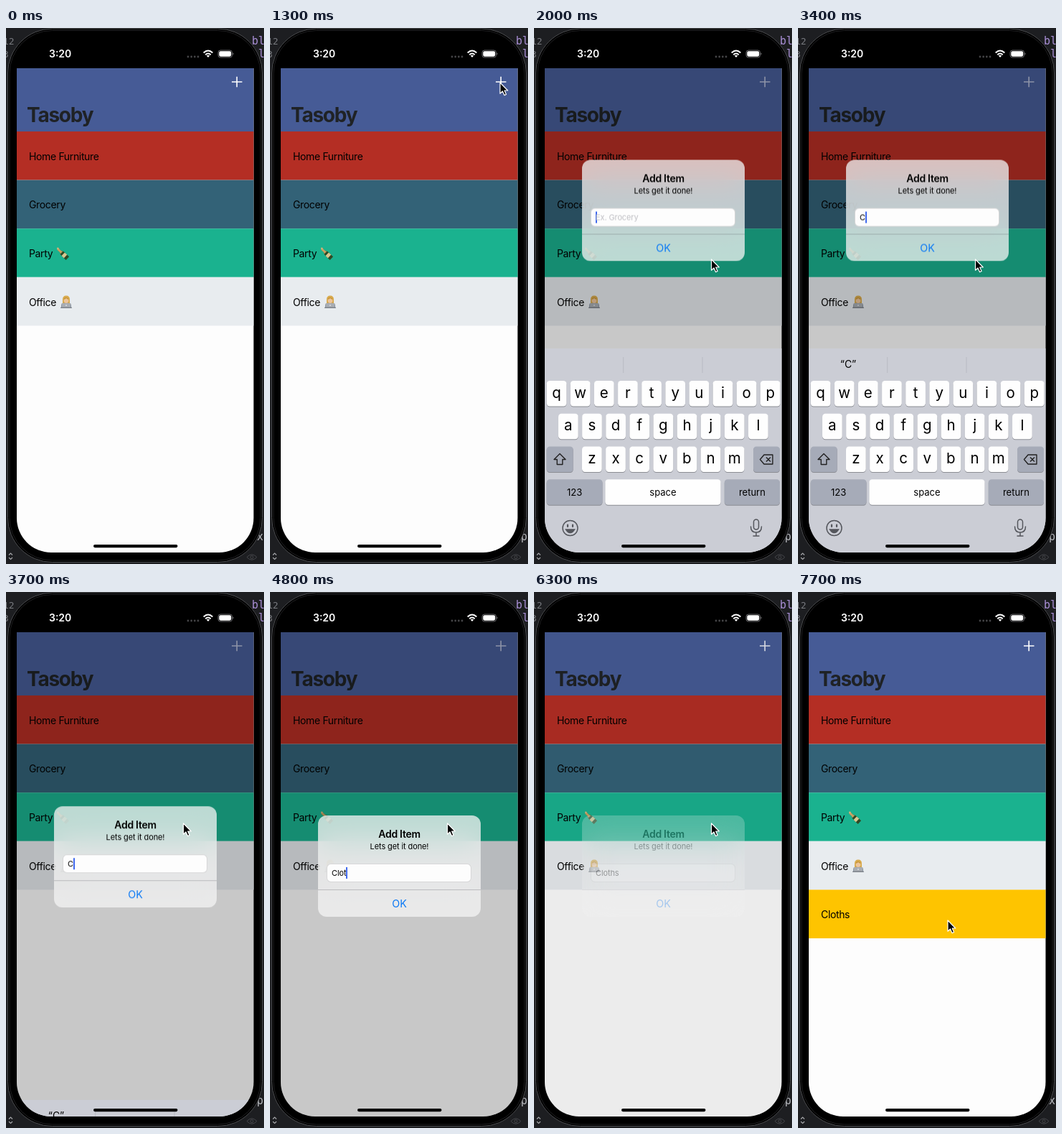
These frames come from a looping animation (360x746 px, 8000 ms). An HTML page:

```html
<!DOCTYPE html>
<html lang="en">
<head>
<meta charset="utf-8">
<title>To-do list</title>
<style>
  html, body { margin: 0; width: 100%; height: 100%; overflow: hidden; background: #1d1e21; }
  #stage { position: absolute; left: 0; top: 0; width: 360px; height: 746px; overflow: hidden;
    font-family: Inter, Roboto, "Liberation Sans", sans-serif; }
  #stage > svg { position: absolute; left: 0; top: 0; display: block; }
  .row { font-size: 14px; letter-spacing: -.025em; }
  .mono { font: 500 15px "DejaVu Sans Mono", monospace; }
  #alert { position: absolute; left: 67px; top: 311px; width: 227px; height: 141px; border-radius: 12px;
    background: rgba(245, 245, 245, .75); backdrop-filter: blur(22px); text-align: center; color: #000; }
  #alert > div { position: absolute; left: 0; width: 100%; white-space: nowrap; }
  #alert .title { top: 16px; font: 600 14px/19px Inter, sans-serif; letter-spacing: -.02em; }
  #alert .note { top: 35px; font-size: 11px; line-height: 16px; letter-spacing: -.01em; }
  #alert .field { left: 12px; top: 67px; width: 202px; height: 26px; box-sizing: border-box; padding-left: 6px;
    border: .6px solid rgba(60, 60, 67, .2); border-radius: 6px; background: #fdfdfd; text-align: left;
    font-size: 11px; line-height: 25px; letter-spacing: -.01em; }
  #alert .rule { top: 103px; height: .8px; background: rgba(60, 60, 67, .25); }
  #alert .ok { top: 113px; font-size: 14.3px; line-height: 19px; color: #0a78f5; }
  #caret { display: inline-block; width: 1.7px; height: 16px; margin-right: -1.7px; vertical-align: -4px; background: #4069ee; }
  #hint { color: #c0c0c5; }
</style>
</head>
<body>
<div id="stage">
  <svg width="360" height="746" viewBox="0 0 360 746">
    <defs>
      <clipPath id="screen"><path d="M15 56H345.5V682A48 48 0 0 1 297.500 730H63A48 48 0 0 1 15 682Z"/></clipPath>
    </defs>
    <rect width="360" height="746" fill="#1d1e21"/>
    <g class="mono">
      <g fill="#77797e" font-size="13"><text x="-4" y="23">12</text><text x="-4" y="41">3</text></g>
      <g fill="#a98fd6"><text x="343" y="23">bl</text><text x="352" y="41">l</text></g>
      <text id="edge" x="350" y="713" fill="#b9bbc0">x</text>
    </g>
    <path d="M4 733.500L6.500 731L9 733.500M4 737L6.500 739.500L9 737" fill="none" stroke="#a5a6a9" stroke-width="1.200"/>
    <g fill="none" stroke="#45464a"><path d="M336 736.500Q343 729 350 736.500Q343 744 336 736.500Z"/><circle cx="343" cy="736.500" r="2"/></g>

    <rect x="2.500" y="1" width="355" height="742.500" rx="62" fill="#000" stroke="#4b4c4f"/>
    <rect x="5" y="3.500" width="350" height="737.500" rx="59.500" fill="none" stroke="#1f1f21"/>

    <g fill="#fff">
      <text x="60" y="41" font-size="14" font-weight="600">3:20</text>
      <g fill="#454547"><circle cx="254" cy="40" r="1.400"/><circle cx="258.700" cy="40" r="1.400"/><circle cx="263.300" cy="40" r="1.400"/><circle cx="268" cy="40" r="1.400"/></g>
      <g fill="none" stroke="#fff" stroke-width="2"><path d="M275.700 34.500Q282 28.500 288.300 34.500"/><path d="M278.300 37.300Q282 33.800 285.700 37.300"/></g>
      <path d="M279.800 38.600Q282 36.800 284.200 38.600L282 41Z"/>
      <rect x="296" y="31" width="19.500" height="10" rx="3.200" fill="none" stroke="#77777a" stroke-width=".9"/>
      <rect x="297.300" y="32.300" width="16.900" height="7.400" rx="2.100"/>
      <path d="M316.600 34.300Q318.600 36 316.600 37.700Z" fill="#8a8a8c"/>
    </g>

    <g clip-path="url(#screen)">
      <rect x="15" y="56" width="331" height="675" fill="#fdfdfd"/>
      <rect x="15" y="56" width="331" height="89" fill="#465b96"/>
      <text x="29" y="131" font-size="28" font-weight="700" letter-spacing="-1.250" fill="#1f2225">Tasoby</text>
      <path id="plus" d="M315 75H329.500M322.200 67.800V82.300" stroke="#fff" stroke-width="1.600"/>
      <g id="rows"></g>
      <g transform="translate(79 314) rotate(-46)">
        <path d="M-3.200 9.500V0Q-3.200 -2.500 -1.300 -4.500V-9H1.300V-4.500Q3.200 -2.500 3.200 0V9.500Z" fill="#2e4a24"/>
        <path d="M-1.500 -4V-9.500H1.500V-4L2.600 -2H-2.600Z" fill="#c7a263"/>
        <rect x="-3.200" y="1" width="6.400" height="4.600" fill="#d9c690"/>
      </g>
      <circle cx="72.300" cy="306.800" r="1.300" fill="#d9b47c"/>
      <g>
        <path d="M79 385V378Q79 372.500 84 372.500Q89 372.500 89 378V385Z" fill="#d8aa4c"/>
        <path d="M77 389V386Q77 382.500 84 382.500Q91 382.500 91 386V389Z" fill="#6b7f96"/>
        <ellipse cx="84" cy="379" rx="3.400" ry="4" fill="#edc49a"/>
        <path d="M80.500 378Q81 374.500 84 375Q87.500 375 87.500 378Q85 377.500 84 376Q83 377.500 80.500 378Z" fill="#c79535"/>
        <rect x="77.500" y="383" width="13" height="6.500" rx="1" fill="#a9adb3"/>
        <rect x="76" y="388.600" width="16" height="1.400" rx=".7" fill="#7f848b"/>
        <circle cx="84" cy="386" r=".9" fill="#dfe2e5"/>
      </g>
      <rect id="dim" x="15" y="56" width="331" height="675" fill="#000"/>
      <g id="keys">
        <rect x="15" y="446" width="331" height="320" fill="#cbcdd5"/>
        <path d="M124.700 458V480M235 458V480" stroke="#b7b9c1" stroke-width=".9"/>
        <text id="guess" x="70" y="473" font-size="14" text-anchor="middle">“C”</text>
        <g id="caps"></g>
        <g fill="none" stroke="#222" stroke-width="1.400" stroke-linejoin="round">
          <path d="M36 592.500L44 600.500H39.800V607.500H32.200V600.500H28Z"/>
          <path d="M315.500 600.500L321 594H333V607H321ZM324 597.500L330 603.500M330 597.500L324 603.500"/>
        </g>
        <g fill="none" stroke="#54565c" stroke-width="1.500" stroke-linecap="round">
          <circle cx="50.500" cy="696" r="10.500"/>
          <path d="M44.500 698Q50.500 707 56.500 698Z" fill="#54565c"/>
          <path d="M47 691.500V694M54 691.500V694" stroke-width="2.200"/>
          <rect x="306.500" y="684" width="7" height="14" rx="3.500"/>
          <path d="M302.500 694Q302.500 702 310 702Q317.500 702 317.500 694M310 702V707M306 707H314"/>
        </g>
      </g>
    </g>
    <rect x="122" y="719" width="117.500" height="4.200" rx="2.100"/>
  </svg>

  <div id="alert">
    <div class="title">Add Item</div>
    <div class="note">Lets get it done!</div>
    <div class="field"><span id="typed"></span><span id="caret"></span><span id="hint">Ex. Grocery</span></div>
    <div class="rule"></div>
    <div class="ok">OK</div>
  </div>

  <svg id="cursor" width="20" height="24" viewBox="-2 -2 20 24">
    <path d="M0 0V15.200L3.500 12L6 17.600L8.600 16.500L6.200 11H10.800Z" fill="#000" stroke="#fff" stroke-width="1.200" stroke-linejoin="round"/>
  </svg>
</div>

<script>
const LOOP = 8000, STEP = 100;
const $ = id => document.getElementById(id);

function add(parent, tag, attrs, text = '') {
  const el = document.createElementNS('http://www.w3.org/2000/svg', tag);
  for (const k in attrs) el.setAttribute(k, attrs[k]);
  el.textContent = text;
  return parent.appendChild(el);
}

// List rows
const ROWS = [['Home Furniture', '#b42e24'], ['Grocery', '#336277'], ['Party', '#1ab28f'],
  ['Office', '#e8ecef'], ['Cloths', '#fec400']];
const rows = ROWS.map(([label, fill], i) => {
  const g = add($('rows'), 'g', {}), y = 144 + i * 67.6;
  add(g, 'rect', { x: 15, y, width: 331, height: 67.6, fill });
  add(g, 'text', { x: 32, y: y + 39.7, class: 'row' }, label);
  return g;
});

// Keyboard
function key(x, y, w, label, special, size = 20.5) {
  const box = { x, width: w, height: 35.5, rx: 4.2 };
  add($('caps'), 'rect', { ...box, y: y + 1, fill: '#8b8d94' });
  add($('caps'), 'rect', { ...box, y, fill: special ? '#a6abb8' : '#fefefe' });
  add($('caps'), 'text', { x: x + w / 2, y: y + (size > 15 ? 23.5 : 22.3), 'font-size': size, 'text-anchor': 'middle' }, label);
}
[['qwertyuiop', 17.7], ['asdfghjkl', 34], ['zxcvbnm', 67]].forEach(([line, x], r) =>
  [...line].forEach((c, i) => key(x + i * 33.13, 491 + r * 45.7, 27.7, c)));
key(17.7, 582.4, 37, '', true);
key(306, 582.4, 37, '', true);
key(17.7, 628.2, 77.8, '123', true, 13);
key(99.3, 628.2, 161.3, 'space', false, 13);
key(265.8, 628.2, 77.2, 'return', true, 13);

// Time tables
const PATH = [[500, 346, 366], [600, 341, 200], [700, 341, 200], [800, 330, 110], [900, 321, 76], [1300, 321, 76],
  [1500, 323, 108], [1900, 247.5, 322], [7000, 247.5, 322], [7400, 152, 484], [7700, 209, 457]];
const TYPED = [[0, ''], [3400, 'C'], [4500, 'Cl'], [4700, 'Clo'], [4800, 'Clot'], [5600, 'Cloth'], [5700, 'Cloths']];
const CARET = [[0, 1], [2300, .6], [2400, .2], [2500, 0], [3000, .5], [3100, 1], [6200, 0]];

const at = (table, t) => table.filter(s => s[0] <= t).pop()[1];

// Critically damped spring, 0 to 1, from the given start
function spring(t, start) {
  const x = Math.max(0, t - start) * 0.01826;
  return x > 9 ? 1 : 1 - (1 + x) * Math.exp(-x);
}

function point(t) {
  const i = PATH.findIndex(p => p[0] > t);
  if (i < 0) return PATH[PATH.length - 1].slice(1);
  const [a, b] = [PATH[i - 1], PATH[i]], k = (t - a[0]) / (b[0] - a[0]);
  return [1, 2].map(n => a[n] + (b[n] - a[n]) * k);
}

function render(t) {
  const shown = spring(t, 1320) - spring(t, 6169);
  const leave = spring(t, 3487);
  const board = spring(t, 1412) - leave;
  const lift = spring(t, 1422) - leave;

  $('dim').setAttribute('opacity', 0.21 * shown);
  $('plus').setAttribute('opacity', 1 - 0.42 * shown);
  $('keys').setAttribute('transform', `translate(0 ${290 * (1 - board)})`);
  $('guess').setAttribute('opacity', t >= 3400 ? 1 : 0);
  rows[4].style.display = t >= 6500 ? '' : 'none';
  $('edge').textContent = t >= 1300 && t < 6600 ? 'p' : 'x';

  const scale = 1.2 - 0.2 * spring(t, 1320);
  $('alert').style.display = shown > 0.002 ? '' : 'none';
  $('alert').style.opacity = shown;
  $('alert').style.transform = `translateY(${-127.5 * lift}px) scale(${scale})`;

  const text = at(TYPED, t);
  $('typed').textContent = text;
  $('hint').style.display = text ? 'none' : '';
  $('caret').style.opacity = at(CARET, t);

  $('cursor').style.display = t >= 500 ? '' : 'none';
  if (t >= 500) {
    const [x, y] = point(t);
    $('cursor').style.transform = `translate(${x - 2}px, ${y - 2}px)`;
  }
}

const begin = performance.now();
function frame() {
  const t = (performance.now() - begin) % LOOP;
  render(Math.floor(t / STEP) * STEP);
  requestAnimationFrame(frame);
}
frame();
</script>
</body>
</html>
```
